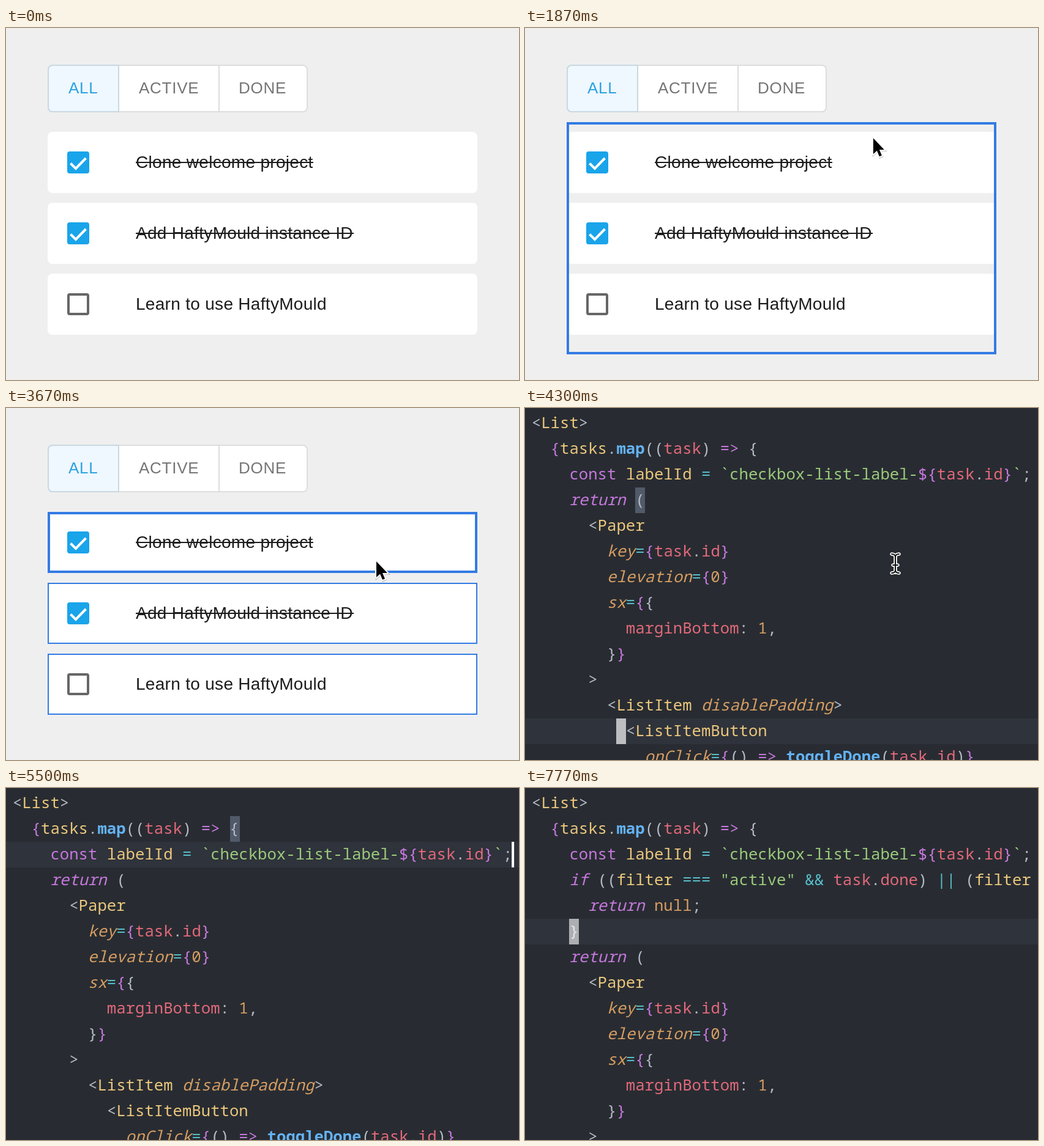
An HTML page that plays this animation: 838x576 px, repeating every 7.8 s.

```html
<!DOCTYPE html>
<html lang="en">
<head>
<meta charset="utf-8">
<title>From list item to code</title>
<style>
  html, body { margin: 0; width: 100%; height: 100%; overflow: hidden; background: #efefef; }
  svg { display: block; position: fixed; left: 0; top: 0; }
  text { white-space: pre; }
  #page { font-family: "Liberation Sans", Arial, sans-serif; }
  #tabs text { font-size: 26px; letter-spacing: .74px; fill: #757575; }
  #items text { font-size: 28px; letter-spacing: .3px; fill: #1c1c1c; }
  #code { font: 25.67px "Noto Sans Mono", "DejaVu Sans Mono", monospace; }
  .outline { fill: none; stroke: #337be4; }
</style>
</head>
<body>
<svg width="838" height="576" viewBox="0 0 838 576">
  <g id="page">
    <rect width="838" height="576" fill="#efefef"/>
    <g id="tabs">
      <rect x="69" y="61" width="423" height="76" rx="7" fill="#fff" stroke="#dcdede" stroke-width="2"/>
      <path d="M184 61H76a7 7 0 0 0-7 7v62a7 7 0 0 0 7 7H184z" fill="#eff7ff" stroke="#c9d8e1" stroke-width="2"/>
      <path d="M348 61V137" stroke="#dcdede" stroke-width="2"/>
      <text x="102" y="107" style="fill:#2ba3e0">ALL</text>
      <text x="217" y="107">ACTIVE</text>
      <text x="380" y="107">DONE</text>
    </g>
    <g id="items"></g>
    <rect id="listOutline" class="outline" x="70" y="156" width="698" height="376" stroke-width="4"/>
    <g id="itemOutlines" class="outline" stroke-width="2">
      <rect x="70" y="172" width="698" height="96" stroke-width="4"/>
      <rect x="69" y="287" width="700" height="98"/>
      <rect x="69" y="403" width="700" height="98"/>
    </g>
    <g id="arrow">
      <path d="M1 3V30L7.300 24.500 11.500 34 16 32 12 22.500H20.500z" fill="#000" opacity=".18" stroke="#000" stroke-width="3"/>
      <path d="M1 2V28L7 22.500 11 32 15 30.300 11 21H19z" fill="#000" stroke="#fff" stroke-width="4" stroke-linejoin="round" paint-order="stroke"/>
    </g>
  </g>
  <g id="code">
    <rect width="838" height="576" fill="#282c32"/>
    <rect id="lineGlow" width="838" height="42" fill="#2f333b"/>
    <rect id="bracket" width="16" height="42" fill="#515a69"/>
    <g id="head"></g>
    <g id="added"></g>
    <g id="tail"></g>
    <g id="block">
      <rect width="16" height="42" fill="#f0f0f0"/>
      <text id="blockChar" y="29" fill="#fff">}</text>
    </g>
    <rect id="bar" width="4" height="42" fill="#fff"/>
    <g id="beam" fill="none" stroke-linecap="round">
      <path id="beamShape" d="M599 239Q605 239 605 244Q605 239 611 239M605 243V266M601 257H609M599 270Q605 270 605 265Q605 270 611 270" stroke="#fff" stroke-width="5"/>
      <use href="#beamShape"/>
      <path d="M599 239Q605 239 605 244Q605 239 611 239M605 243V266M601 257H609M599 270Q605 270 605 265Q605 270 611 270" stroke="#111" stroke-width="2"/>
    </g>
  </g>
</svg>
<script>
const LOOP = 7800, LEFT = 10.8, ADVANCE = 15.4, TOP = 4, PITCH = 42;
const $ = id => document.getElementById(id);
const show = (id, on) => $(id).setAttribute('display', on ? 'inline' : 'none');
const move = (id, x, y) => $(id).setAttribute('transform', `translate(${x} ${y})`);
const colX = col => LEFT + col * ADVANCE;
const rowY = row => TOP + row * PITCH;
const clamp = v => Math.min(1, Math.max(0, v));
const smooth = v => v * v * (3 - 2 * v);
const mix = (a, b, p) => a + (b - a) * p;

// Task list: label, and the strike-through's right end for finished tasks
const tasks = [
  ['Clone welcome project', 502],
  ['Add HaftyMould instance ID', 568],
  ['Learn to use HaftyMould', 0]
];
$('items').innerHTML = tasks.map(([label, end], i) => `
  <g transform="translate(0 ${170 + i * 116})">
    <rect x="68" width="702" height="100" rx="8" fill="#fff"/>
    ${end
      ? `<rect x="100" y="32" width="36" height="36" rx="4" fill="#1aa4ea"/>
         <path d="M105.500 51.500L114 60 130.500 43" fill="none" stroke="#fff" stroke-width="4"/>`
      : '<rect x="102" y="34" width="32" height="32" rx="2" fill="none" stroke="#666" stroke-width="4"/>'}
    <text x="212" y="59">${label}</text>
    ${end ? `<path d="M212 50H${end}" stroke="#1c1c1c" stroke-width="2"/>` : ''}
  </g>`).join('');

// Code markup: "~" starts a token, its first letter picks the colour, capitals mean italic
const colours = {
  w: '#b4bac4', y: '#ebc77d', r: '#e2697a', p: '#c678dd',
  c: '#56bcc9', g: '#9bca7c', o: '#d69d62', b: '#64b2f2'
};
const head = [
  'w<~yList~w>',
  '  p{~ytasks~w.~bmap~w((~rtask~w) ~p=> ~w{',
  '    pconst ~ylabelId ~c= ~g`checkbox-list-label-~p${~rtask~w.~rid~p}~g`~w;'
];
const added = [
  '    Pif ~w((~yfilter ~c=== ~g"active" ~c&& ~rtask~w.~rdone~w) ~c|| ~w(~yfilter',
  '      Preturn ~onull~w;',
  '    w}'
];
const tail = [
  '    Preturn ~w(',
  '      w<~yPaper',
  '        Okey~c=~p{~rtask~w.~rid~p}',
  '        Oelevation~c=~p{~o0~p}',
  '        Osx~c=~p{~w{',
  '          rmarginBottom~w: ~o1~w,',
  '        w}~p}',
  '      w>',
  '        w<~yListItem ~OdisablePadding~w>',
  '          w<~yListItemButton',
  '            OonClick~c=~p{~w() ~p=> ~btoggleDone~w(~rtask~w.~rid~w)~p}'
];
const escapeText = s => s.replace(/&/g, '&amp;').replace(/</g, '&lt;');

function token(source) {
  const key = source[0], kind = key.toLowerCase();
  const style = (key !== kind ? 'font-style:italic;' : '') + (kind === 'b' ? 'font-weight:600' : '');
  return `<tspan fill="${colours[kind]}" style="${style}">${escapeText(source.slice(1))}</tspan>`;
}
function write(id, lines, firstRow) {
  $(id).innerHTML = lines.map((line, i) => {
    const indent = line.search(/\S/);
    const tokens = line.trimStart().split('~').map(token).join('');
    return `<text x="${colX(indent)}" y="${rowY(firstRow + i) + 29}">${tokens}</text>`;
  }).join('');
}
write('head', head, 0);
write('added', added, 3);
write('tail', tail, 3);

// Smooth caret blink that starts fading at the given time
function blink(t, start) {
  if (t < start) return 1;
  const u = (t - start) % 1000;
  return u < 500 ? 1 - smooth(clamp(u / 300)) : smooth(clamp((u - 500) / 300));
}

function drawPage(t) {
  const enter = 1 - (1 - clamp((t - 1440) / 530)) ** 2;
  const drift = smooth(clamp((t - 2840) / 360));
  move('arrow', mix(mix(592, 567, enter), 604, drift), mix(mix(-36, 187, enter), 250, drift) - 1);
  show('listOutline', t >= 1770 && t < 1900);
  show('itemOutlines', t >= 1900);
}

function caretAt(t) {
  if (t < 5170) return { row: 12, col: 9, opacity: blink(t, 4200) };
  if (t < 5490) {
    const row = Math.max(2, 11 - Math.floor((t - 5170) / 31));
    return { row, col: row === 10 ? 6 : 9, opacity: 1 };
  }
  if (t < 5820) return { row: 2, col: 53, insert: true };
  if (t < 6170) return { row: 3, col: 4, insert: true };
  if (t < 6610) return { row: 5, col: 5, insert: true };
  return { row: 5, col: 4, opacity: blink(t, 7090), char: true };
}

function drawCode(t) {
  const caret = caretAt(t);
  const pasted = t >= 6170;
  move('lineGlow', 0, rowY(caret.row));
  move('tail', 0, PITCH * (pasted ? 3 : t >= 5820 ? 1 : 0));
  show('added', pasted);
  show('bracket', !pasted);
  if (caret.row > 3) move('bracket', 180, rowY(3));
  else move('bracket', 366, rowY(1));
  show('bar', caret.insert);
  show('block', !caret.insert);
  show('blockChar', caret.char);
  move('bar', colX(caret.col) - 1, rowY(caret.row));
  move('block', Math.round(colX(caret.col)), rowY(caret.row));
  $('block').setAttribute('opacity', caret.opacity ?? 1);
  show('beam', t < 5170);
}

function draw(t) {
  const coding = t >= 3700;
  show('page', !coding);
  show('code', coding);
  (coding ? drawCode : drawPage)(t);
}

const began = performance.now();
function tick() {
  draw((performance.now() - began) % LOOP);
  requestAnimationFrame(tick);
}
tick();
</script>
</body>
</html>
```
